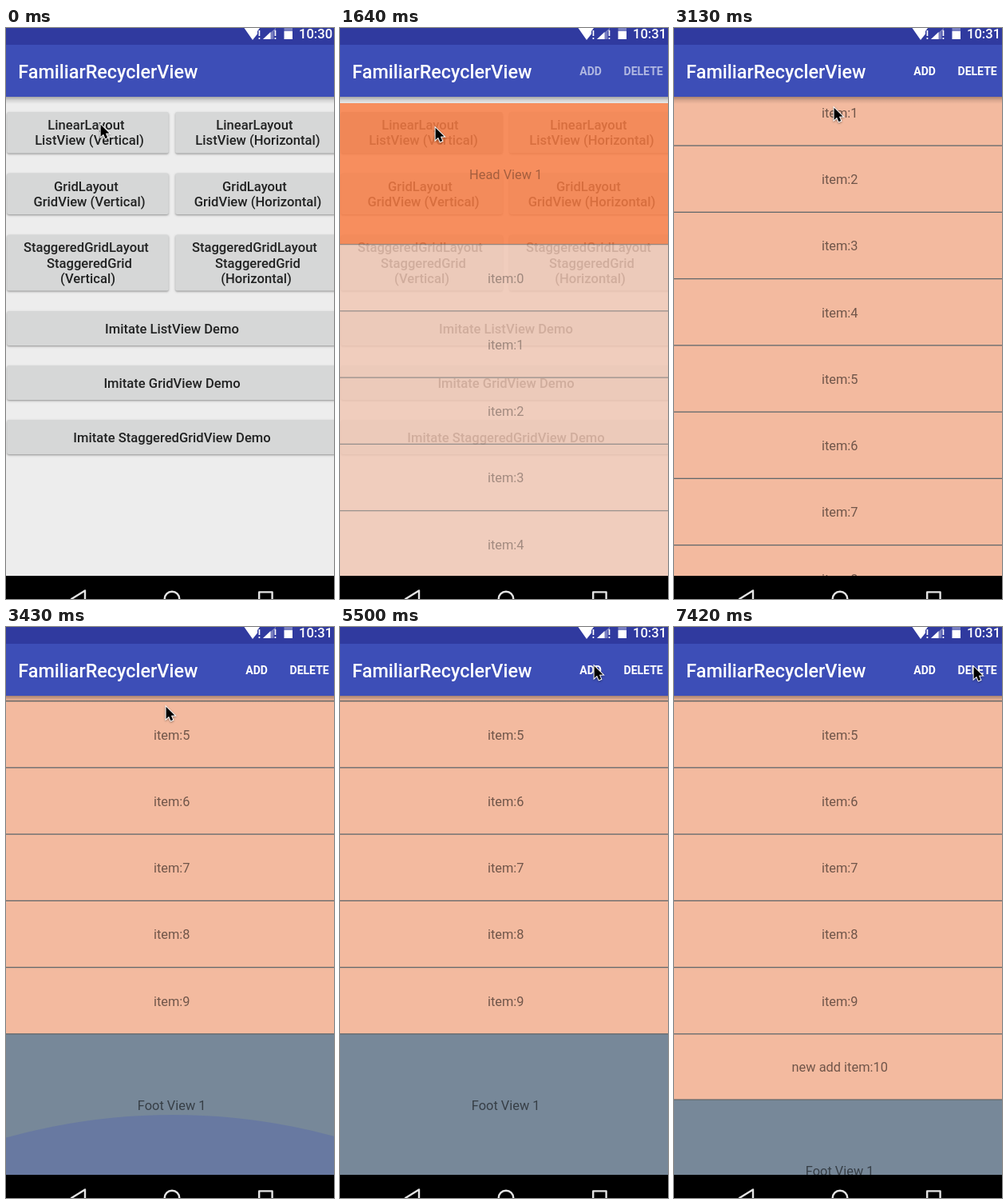
An HTML page with a canvas for the animation above (8000 ms loop, 411 by 714 pixels).

```html
<!DOCTYPE html>
<html lang="en">
<head>
<meta charset="utf-8">
<title>FamiliarRecyclerView</title>
<style>
html, body { margin: 0; width: 411px; height: 714px; overflow: hidden; background: #ededed; }
canvas { display: block; width: 411px; height: 714px; }
</style>
</head>
<body>
<canvas id="stage"></canvas>
<script>
const W = 411, H = 714, LOOP = 8000;
const canvas = document.getElementById('stage');
const ctx = canvas.getContext('2d');
const dpr = window.devicePixelRatio || 1;
canvas.width = W * dpr;
canvas.height = H * dpr;

const BAR_END = 86, NAV_TOP = 685;
const FIRST_LINE = 262.6, ROW = 83.25, ROWS = 10, NEW_ROW = 82.2;
const SCROLL_END = 586.25;
const INK = 'rgba(0,0,0,.54)', PEACH = '#f3ba9f', BACK = '#ededed';

// Each step: start time, cursor x, cursor y, then the values that change.
const steps = [
  [0, 118, 120, { scroll: 0, ripple: 0, list: 0, glow: 0, gap: 0, added: 0, clock: '10:30' }],
  [1050, 118, 122],
  [1200, 119, 124],
  [1490, 119, 124, { ripple: 89, clock: '10:31' }],
  [1640, 119, 124, { ripple: 130, list: 0.6 }],
  [1790, 119, 124, { ripple: 0, list: 1 }],
  [2240, 159, 191],
  [2390, 188, 300],
  [2540, 199, 372],
  [2690, 200, 381],
  [2840, 200, 300, { scroll: 81 }],
  [2990, 200, 190, { scroll: 191 }],
  [3130, 200, 99, { scroll: 282 }],
  [3280, 200, 99, { scroll: 427 }],
  [3430, 200, 99, { scroll: SCROLL_END, glow: 0.27 }],
  [3870, 209, 125, { glow: 0 }],
  [4020, 232, 139],
  [4170, 275, 112],
  [4320, 303, 67],
  [4610, 313, 53],
  [4760, 319, 46],
  [5060, 319, 47],
  [5500, 318, 48],
  [6090, 318, 49, { gap: 45 }],
  [6240, 318, 49, { gap: NEW_ROW, added: 0.25 }],
  [6380, 318, 49, { added: 1 }],
  [6980, 330, 50],
  [7130, 350, 50],
  [7280, 368, 50],
  [7420, 375, 49]
];

function poseAt(time) {
  const pose = {};
  for (const [start, x, y, change] of steps) {
    if (start > time) break;
    Object.assign(pose, { x, y }, change);
  }
  return pose;
}

function rect(x, y, w, h, color) {
  ctx.fillStyle = color;
  ctx.fillRect(x, y, w, h);
}

function text(str, x, y, size, weight, color, align = 'center') {
  ctx.font = `${weight} ${size}px Roboto, sans-serif`;
  ctx.textAlign = align;
  ctx.fillStyle = color;
  ctx.fillText(str, x, y);
}

function path(points) {
  ctx.beginPath();
  points.forEach(([x, y]) => ctx.lineTo(x, y));
  ctx.closePath();
}

function fillPath(points, color) {
  path(points);
  ctx.fillStyle = color;
  ctx.fill();
}

function shadow(color, blur, dy) {
  ctx.shadowColor = color;
  ctx.shadowBlur = blur * dpr;
  ctx.shadowOffsetY = dy * dpr;
}

function button(x, y, w, h, lines, ripple) {
  ctx.save();
  ctx.beginPath();
  ctx.roundRect(x, y, w, h, 2.3);
  ctx.save();
  shadow('rgba(0,0,0,.36)', 2.4, 1.2);
  ctx.fillStyle = '#d6d7d7';
  ctx.fill();
  ctx.restore();
  if (ripple) {
    ctx.clip();
    ctx.beginPath();
    ctx.arc(106, 130, ripple, 0, 7);
    ctx.fillStyle = 'rgba(0,0,0,.105)';
    ctx.fill();
  }
  ctx.restore();
  const shift = lines.length > 1 ? [-2.1, 2, 0] : [0];
  const top = y + h / 2 - (lines.length - 1) * 9.6 + 6.1;
  lines.forEach((line, i) =>
    text(line, x + w / 2 + shift[i], top + i * 19.2, 16.6, 500, '#212222'));
}

function drawMenu(ripple) {
  rect(0, BAR_END, W, H, BACK);
  const pairs = [
    [105, 51.5, 'LinearLayout', 'ListView'],
    [181.5, 51.5, 'GridLayout', 'GridView'],
    [258.5, 70, 'StaggeredGridLayout', 'StaggeredGrid']
  ];
  pairs.forEach(([y, h, layout, view], row) => {
    ['(Vertical)', '(Horizontal)'].forEach((way, col) => {
      const lines = row < 2 ? [layout, `${view} ${way}`] : [layout, view, way];
      button(1.2 + col * 211, y, 202.6, h, lines, row + col === 0 ? ripple : 0);
    });
  });
  ['ListView', 'GridView', 'StaggeredGridView'].forEach((name, i) =>
    button(1.2, 354 + i * 68, 413.6, 43, [`Imitate ${name} Demo`]));
}

function divider(y) {
  rect(0, y - 0.65, W, 1.3, '#62686b');
}

function label(str, middle) {
  text(str, 207.7, middle + 5.7, 16.4, 400, INK);
}

function drawList(p) {
  rect(0, BAR_END, W, H, BACK);
  const top = FIRST_LINE - p.scroll;
  rect(0, top - 176.6, W, 176.6, '#ff5000');
  label('Head View 1', top - 87.8);
  for (let i = 0; i < ROWS; i++) {
    const y = top + i * ROW;
    rect(0, y, W, ROW, PEACH);
    label('item:' + i, y + 42.4);
  }
  const end = top + ROWS * ROW;
  if (p.added) {
    ctx.save();
    ctx.globalAlpha *= p.added;
    rect(0, end, W, NEW_ROW, PEACH);
    label('new add item:10', end + 41.2);
    ctx.restore();
  }
  const foot = end + p.gap;
  rect(0, foot, W, 180, '#778899');
  label('Foot View 1', foot + 89.2);
  for (let i = 0; i <= ROWS; i++) divider(top + i * ROW);
  if (p.gap) divider(foot);
  if (p.glow) {
    ctx.save();
    ctx.globalAlpha = p.glow;
    ctx.beginPath();
    ctx.arc(209, 610 + 779, 779, 0, 7);
    ctx.fillStyle = '#3f51b5';
    ctx.fill();
    ctx.restore();
  }
}

function drawBars(p) {
  const fade = ctx.createLinearGradient(0, BAR_END, 0, BAR_END + 9);
  fade.addColorStop(0, 'rgba(0,0,0,.3)');
  fade.addColorStop(0.5, 'rgba(0,0,0,.1)');
  fade.addColorStop(1, 'rgba(0,0,0,0)');
  rect(0, BAR_END, W, 9, fade);
  rect(0, 0, W, BAR_END, '#3d4eb7');
  rect(0, 0, W, 21, '#303a9f');
  text('FamiliarRecyclerView', 15.3, 62.6, 23.4, 500, '#fff', 'left');
  ctx.save();
  ctx.globalAlpha = p.list;
  text('ADD', 300.2, 59.3, 14.04, 700, '#fff', 'left');
  text('DELETE', 355.5, 59.3, 14.04, 700, '#fff', 'left');
  ctx.restore();
  drawStatus(p.clock);
}

function drawStatus(clock) {
  const dim = 'rgba(255,255,255,.35)';
  fillPath([[298.5, 0], [318, 0], [315, 4], [315, 7.5], [309, 15]], '#fff');
  fillPath([[338, 0], [338, 4], [335.5, 4], [335.5, 14], [322, 14]], dim);
  fillPath([[331.5, 5], [331.5, 14], [322, 14]], '#fff');
  for (const x of [316.6, 336.6]) {
    rect(x, 3, 1.7, 7, '#fff');
    rect(x, 12, 1.7, 2, '#fff');
  }
  rect(348.5, 0, 10.5, 4, dim);
  rect(348.5, 4, 10.5, 10, '#fff');
  text(clock, 367, 13, 16.6, 500, '#fff', 'left');
}

function drawNav() {
  rect(0, NAV_TOP, W, H - NAV_TOP, '#000');
  ctx.strokeStyle = '#e4e4e4';
  ctx.lineWidth = 2.4;
  ctx.lineJoin = 'round';
  path([[99, 703.5], [99, 724.5], [82, 714]]);
  ctx.stroke();
  ctx.beginPath();
  ctx.arc(208, 714, 9.3, 0, 7);
  ctx.stroke();
  ctx.strokeRect(317.2, 705.4, 16.4, 16.4);
}

function drawCursor(x, y) {
  ctx.save();
  ctx.translate(x + 0.6, y + 0.8);
  path([[0, 0], [0, 15.2], [3.5, 12], [5.9, 17.4], [8.6, 16.3], [6.3, 11], [10.9, 10.8]]);
  ctx.lineJoin = 'miter';
  ctx.lineWidth = 2;
  ctx.strokeStyle = '#fff';
  ctx.save();
  shadow('rgba(0,0,0,.4)', 2.5, 1);
  ctx.stroke();
  ctx.restore();
  ctx.fillStyle = '#000';
  ctx.fill();
  ctx.restore();
}

function draw(time) {
  const p = poseAt(time);
  ctx.setTransform(dpr, 0, 0, dpr, 0, 0);
  if (p.list < 1) drawMenu(p.ripple);
  if (p.list > 0) {
    ctx.save();
    ctx.globalAlpha = p.list;
    ctx.translate(0, (1 - p.list) * 20);
    drawList(p);
    ctx.restore();
  }
  drawBars(p);
  drawNav();
  drawCursor(p.x, p.y);
}

function tick() {
  draw(performance.now() % LOOP);
  requestAnimationFrame(tick);
}
tick();
</script>
</body>
</html>
```
